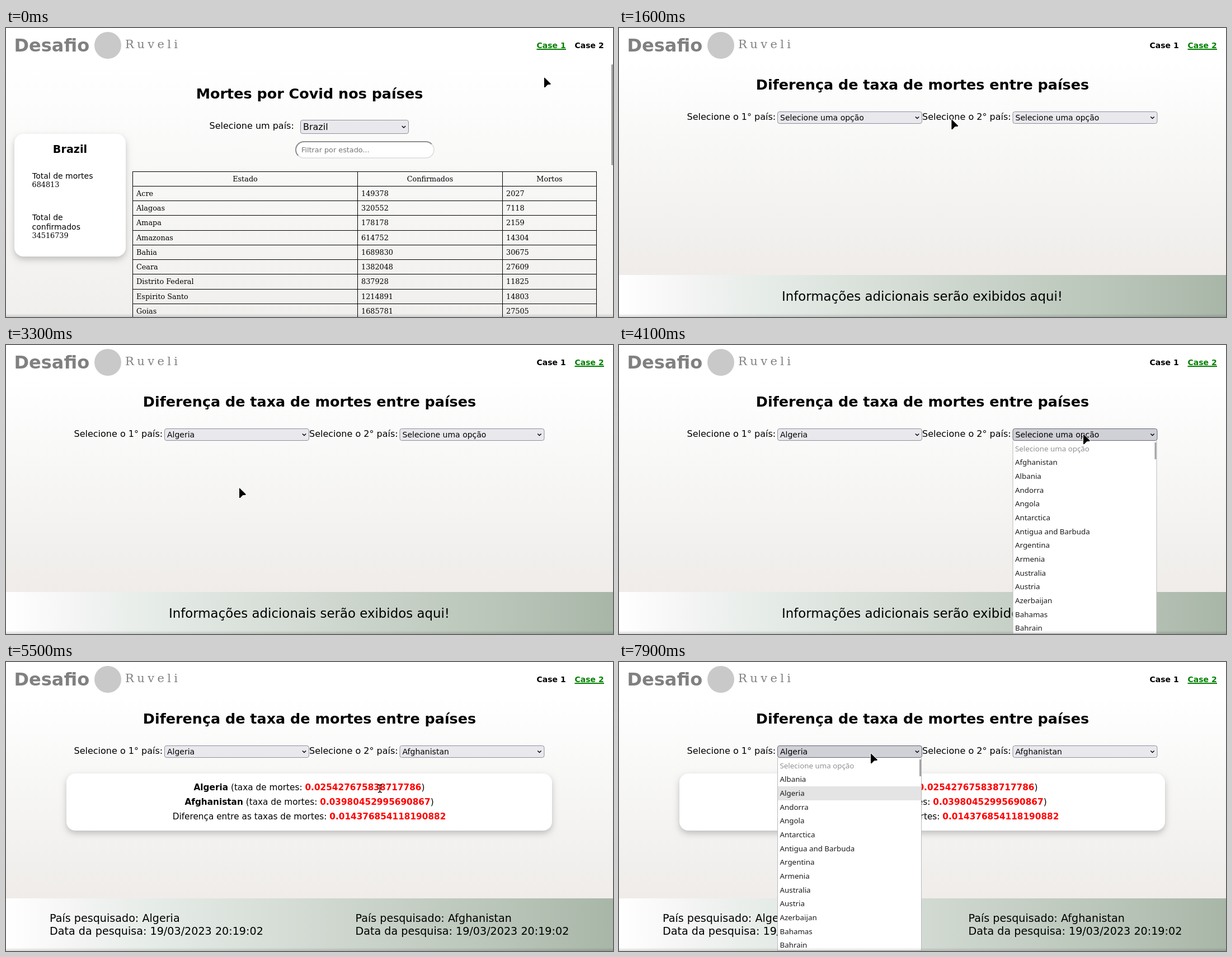
Animation, 1085 px wide and 516 px high, one loop 8 s. Source, as an HTML page with a canvas:

```html
<!DOCTYPE html>
<html lang="pt">
<head>
<meta charset="utf-8">
<title>Desafio</title>
<style>
html, body { margin: 0; width: 100%; height: 100%; overflow: hidden; background: #fff; }
canvas { display: block; width: 1085px; height: 516px; }
</style>
</head>
<body>
<canvas id="stage" width="1085" height="516"></canvas>
<script>
const W = 1085, H = 516, LOOP = 8000, STEP = 100;
const c = document.getElementById('stage').getContext('2d');
const SANS = '"DejaVu Sans", sans-serif';
const SERIF = '"DejaVu Serif", serif';
const LIST = 'Ubuntu, "Noto Sans", sans-serif';
const PROMPT = 'Selecione uma opção';
const ROW = 24.65;

const countries = ['Afghanistan', 'Albania', 'Algeria', 'Andorra', 'Angola', 'Antarctica',
  'Antigua and Barbuda', 'Argentina', 'Armenia', 'Australia', 'Austria', 'Azerbaijan',
  'Bahamas', 'Bahrain'];

const states = [
  ['Acre', 149378, 2027], ['Alagoas', 320552, 7118], ['Amapa', 178178, 2159],
  ['Amazonas', 614752, 14304], ['Bahia', 1689830, 30675], ['Ceara', 1382048, 27609],
  ['Distrito Federal', 837928, 11825], ['Espirito Santo', 1214891, 14803],
  ['Goias', 1685781, 27505]];

// Pointer path: time, x, y
const path = [
  [0, 962, 89], [400, 1032, 35], [600, 1030, 36], [800, 1010, 58], [900, 905, 93],
  [1700, 550, 174], [1800, 550, 174], [2100, 512, 163], [2200, 512, 163], [2300, 510, 169],
  [2900, 417, 256], [3300, 417, 256], [3800, 805, 171], [4100, 830, 160], [4900, 780, 203],
  [5000, 780, 203], [5900, 579, 244], [6200, 550, 253], [6300, 550, 253], [6400, 543, 258],
  [6600, 941, 290], [6700, 941, 290], [6800, 944, 288], [6900, 534, 279], [7500, 460, 169],
  [7600, 456, 168], [7900, 450, 164]];

function pointerAt(t) {
  const i = path.findIndex(p => p[0] > t);
  if (i < 0) return path[path.length - 1].slice(1);
  const [t0, x0, y0] = path[i - 1], [t1, x1, y1] = path[i];
  const k = (t - t0) / (t1 - t0);
  return [x0 + (x1 - x0) * k, y0 + (y1 - y0) * k];
}

function text(s, x, y, font, color = '#000', align = 'left') {
  c.font = font;
  c.fillStyle = color;
  c.textAlign = align;
  c.fillText(s, x, y);
}

function rect(x, y, w, h, color) {
  c.fillStyle = color;
  c.fillRect(x, y, w, h);
}

function rounded(x, y, w, h, r, fill, stroke) {
  c.beginPath();
  c.roundRect(x, y, w, h, r);
  if (fill) { c.fillStyle = fill; c.fill(); }
  if (stroke) { c.strokeStyle = stroke; c.stroke(); }
}

function polygon(points) {
  c.beginPath();
  points.forEach(([x, y]) => c.lineTo(x, y));
  c.closePath();
}

function gradient(x1, y1, x2, y2, stops) {
  const g = c.createLinearGradient(x1, y1, x2, y2);
  stops.forEach(([k, color]) => g.addColorStop(k, color));
  return g;
}

function card(x, y, w, h) {
  c.save();
  c.shadowColor = 'rgba(0,0,0,.22)';
  c.shadowBlur = 12;
  c.shadowOffsetY = 5;
  rounded(x, y, w, h, 16, '#fff');
  c.restore();
}

function select(x, y, w, h, label, size, base, dark) {
  c.lineWidth = 1;
  rounded(x + .5, y + .5, w - 1, h - 1, 3.5, dark ? '#d0d0d7' : '#e9e9ed', dark ? '#676774' : '#8f8f9d');
  text(label, x + 5, base, `${size}px ${SANS}`);
  const cx = x + w - 9, cy = y + h / 2;
  c.beginPath();
  c.moveTo(cx - 3.2, cy - 1.6);
  c.lineTo(cx, cy + 1.6);
  c.lineTo(cx + 3.2, cy - 1.6);
  c.strokeStyle = '#000';
  c.lineWidth = 1.4;
  c.stroke();
}

// Inset border: dark on the top and left, light on the bottom and right
function input(x, y, w, h, hint) {
  c.lineWidth = 2;
  rounded(x + 1, y + 1, w - 2, h - 2, 15, '#fff', '#e3e3e3');
  c.save();
  polygon([[x, y + h], [x + h / 2, y + h / 2], [x + w - h / 2, y + h / 2], [x + w, y], [x, y]]);
  c.clip();
  rounded(x + 1, y + 1, w - 2, h - 2, 15, null, '#8f8f8f');
  c.restore();
  text(hint, x + 11, y + 20, `12.8px ${SANS}`, '#757575');
}

function dropdown(x, hidden, active) {
  rect(x, 171, 258, H - 171, '#b9b9bd');
  rect(x + 1, 171, 256, H - 172, '#fff');
  const rows = [PROMPT, ...countries.filter(n => n !== hidden)];
  rows.slice(0, 14).forEach((name, i) => {
    const y = 185 + ROW * i;
    if (i && i === active) rect(x + 1, Math.round(y - 12.4), 256, 25, '#e4e4e4');
    text(name, x + 4.5, Math.round(y + 4.8), `13.35px ${LIST}`, i ? '#1c1c1c' : '#929296');
  });
  rect(x + 254, 174, 3, 30, '#a4a4a4');
}

function header(page) {
  rect(0, 0, W, 62, '#fff');
  text('Desafio', 14.5, 42, `bold 32px ${SANS}`, '#808080');
  c.beginPath();
  c.arc(182, 31, 24, 0, 7);
  c.fillStyle = '#c9c9c9';
  c.fill();
  c.letterSpacing = '5.4px';
  text('Ruveli', 213, 36, `21px ${SERIF}`, '#808080');
  c.letterSpacing = '0px';
  [948.5, 1016.5].forEach((x, i) => {
    const on = page === i + 1;
    text('Case ' + (i + 1), x, 36, `bold 14px ${SANS}`, on ? '#008000' : '#000');
    if (on) rect(x, 37, 52.5, 2, '#008000');
  });
}

function heading(s, y) {
  text(s, 542.5, y, `bold 25.45px ${SANS}`, '#000', 'center');
}

function background(bottom) {
  rect(0, 0, W, H, gradient(0, 62, 0, bottom, [[0, '#fff'], [.8, '#f1f0ee'], [1, '#f0ece9']]));
}

function table() {
  const cols = [226, 628, 887, 1055], font = `12.8px ${SERIF}`;
  const rowY = i => Math.floor(256 + 26.25 * i);
  cols.forEach(x => rect(x, 256, 1, H - 256, '#000'));
  for (let i = 0; i < 10; i++) rect(226, rowY(i), 830, 1, '#000');
  ['Estado', 'Confirmados', 'Mortos'].forEach((s, i) =>
    text(s, (cols[i] + cols[i + 1] + 1) / 2, 274, font, '#000', 'center'));
  states.forEach((row, r) => row.forEach((s, i) =>
    text(s, cols[i] + 7, rowY(r + 1) + 18, font)));
}

function firstPage() {
  background(600);
  header(1);
  heading('Mortes por Covid nos países', 126);
  text('Selecione um país:', 363.5, 180, `16px ${SANS}`);
  select(526, 164, 194, 25, 'Brazil', 16, 182);
  input(517, 202, 249, 31, 'Filtrar por estado...');

  card(15, 189, 199, 219);
  text('Brazil', 114.5, 223, `bold 19.2px ${SANS}`, '#000', 'center');
  const label = `14px ${SANS}`, number = `12.8px ${SERIF}`;
  text('Total de mortes', 47, 269, label);
  text('684813', 46.5, 284, number);
  text('Total de', 47, 343, label);
  text('confirmados', 46.5, 360, label);
  text('34516739', 46.5, 375, number);

  table();
  rounded(1082, 65, 3, 180, 1, '#a2a2a2');
}

// Draws [string, bold, color] runs as one centred line
function runs(parts, y) {
  const font = bold => `${bold ? 'bold ' : ''}15.3px ${SANS}`;
  const width = ([s, bold]) => { c.font = font(bold); return c.measureText(s).width; };
  let x = 542 - parts.reduce((sum, p) => sum + width(p), 0) / 2;
  for (const p of parts) {
    text(p[0], x, y, font(p[1]), p[2]);
    x += width(p);
  }
}

function results() {
  card(108, 199, 868, 102);
  const rate = (name, value, y) =>
    runs([[name, true], [' (taxa de mortes: '], [value, true, '#f00'], [')']], y);
  rate('Algeria', '0.025427675838717786', 229);
  rate('Afghanistan', '0.03980452995690867', 255);
  runs([['Diferença entre as taxas de mortes: '], ['0.014376854118190882', true, '#f00']], 281);
}

function footer(done) {
  const top = done ? 422 : 441;
  rect(0, top, W, H - top, gradient(0, 0, W, 0,
    [[0, '#fff'], [.12, '#f3f4f3'], [.24, '#e6ece8'], [.6, '#cad3ca'], [.8, '#bac6b9'], [1, '#a8b6a8']]));
  if (!done) {
    text('Informações adicionais serão exibidos aqui!', 542, 487, `22.9px ${SANS}`, '#000', 'center');
    return;
  }
  [['Algeria', 78], ['Afghanistan', 624.5]].forEach(([name, x]) => {
    text('País pesquisado: ' + name, x, 464, `19.15px ${SANS}`);
    text('Data da pesquisa: 19/03/2023 20:19:02', x, 487, `19.15px ${SANS}`);
  });
}

function secondPage(t, y) {
  const loaded = t >= 1200, done = t >= 5300;
  const first = t >= 3300 ? 'Algeria' : PROMPT;
  const second = t >= 5100 ? 'Afghanistan' : PROMPT;
  background(done ? 422 : 441);
  header(2);
  heading('Diferença de taxa de mortes entre países', 110);
  const x1 = loaded ? 283 : 369, w = loaded ? 259 : 173;
  text('Selecione o 1° país:', x1 - 161.5, 164, `16px ${SANS}`);
  text('Selecione o 2° país:', 542, 164, `16px ${SANS}`);
  select(x1, 149, w, 22, first, 14, 165, (t >= 1900 && t < 2300) || t >= 7500);
  select(703.5, 149, w + (loaded ? 0 : 1), 22, second, 14, 165, t >= 3900 && t < 5100);
  if (done) results();
  footer(done);

  const hovered = Math.round((y - 185) / ROW);
  if (t >= 2100 && t < 3300) dropdown(283, '', hovered);
  if (t >= 4100 && t < 5100) dropdown(703.5, first, hovered);
  if (t >= 7600) dropdown(283, second, t >= 7700 ? 2 : 0);
}

function arrow() {
  polygon([[0, -.5], [.8, -.3], [11.8, 10.6], [11.4, 11.8], [6.2, 12.2], [1.6, 17], [.2, 17], [0, 16.4]]);
  c.lineJoin = 'round';
  c.strokeStyle = '#fff';
  c.lineWidth = 2;
  c.stroke();
  c.fillStyle = '#000';
  c.fill();
}

function textBeam() {
  c.beginPath();
  for (const s of [-1, 1]) {
    c.moveTo(-3.5, 7 * s);
    c.quadraticCurveTo(0, 7 * s, 0, 5 * s);
    c.quadraticCurveTo(0, 7 * s, 3.5, 7 * s);
  }
  c.moveTo(0, -6);
  c.lineTo(0, 6);
  c.strokeStyle = '#000';
  c.lineWidth = 1.4;
  c.stroke();
}

function draw(t) {
  const [x, y] = pointerAt(t);
  if (t < 600) firstPage(); else secondPage(t, y);
  rect(0, 510, W, 6, gradient(0, 510, 0, H, [[0, 'rgba(0,0,0,0)'], [1, 'rgba(0,0,0,.15)']]));
  const overText = t >= 5300 && x > 300 && x < 785 && y > 212 && y < 287;
  c.save();
  c.translate(x, y);
  if (overText) textBeam(); else arrow();
  c.restore();
}

function tick(now) {
  draw(Math.floor(now % LOOP / STEP) * STEP);
  requestAnimationFrame(tick);
}
requestAnimationFrame(tick);
</script>
</body>
</html>
```
